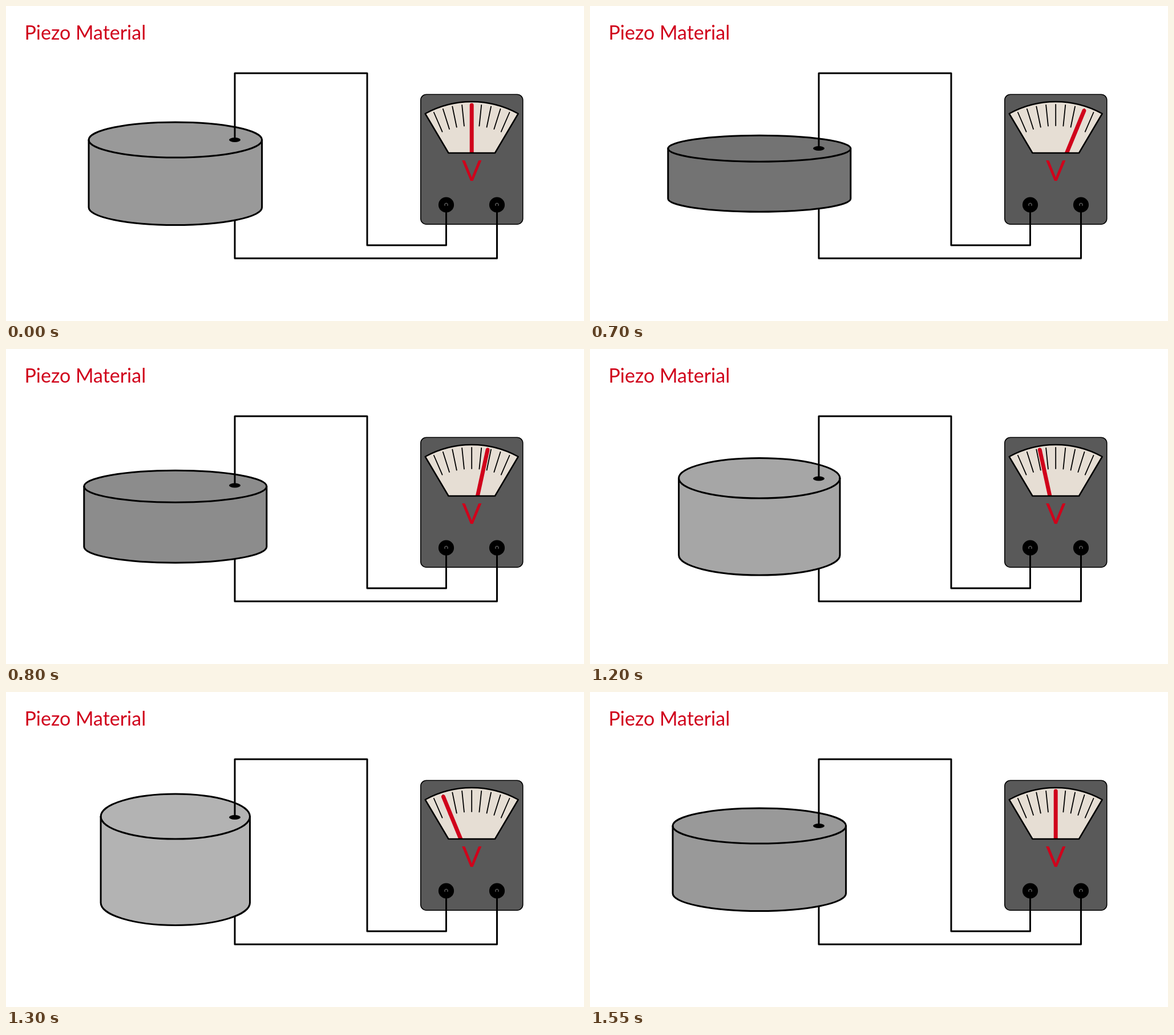
Recreate the animation shown at these times as an HTML page with a canvas. Size 1013x553 px, loop 1750 ms.

```html
<!DOCTYPE html>
<html lang="en">
<head>
<meta charset="utf-8">
<title>Piezo Material</title>
<style>
  html, body { margin: 0; width: 100%; height: 100%; overflow: hidden; background: #fff; }
  canvas { display: block; }
</style>
</head>
<body>
<canvas id="stage" width="1013" height="553"></canvas>
<script>
const ctx = document.getElementById('stage').getContext('2d');
const RED = '#d0021b', LOOP = 1750, TAU = Math.PI * 2;

// rx, ry: rim radii; half: half the side height; pin: contact height; needle: degrees
const rest     = { rx: 151.8, ry: 31,   half: 59.3, pin: 235,   grey: '#999', needle: 0 };
const pressed  = { rx: 160,   ry: 28,   half: 53,   pin: 239.5, grey: '#8c8c8c', needle: 12.3 };
const squeezed = { rx: 160,   ry: 23,   half: 44,   pin: 250,   grey: '#737373', needle: 22.3 };
const pulled   = { rx: 141.2, ry: 35.2, half: 67.5, pin: 227.5, grey: '#a6a6a6', needle: -12.3 };
const drawn    = { rx: 130.7, ry: 39.5, half: 75.7, pin: 220,   grey: '#b3b3b3', needle: -22.3 };

const steps = [
  [0, rest], [600, pressed], [700, squeezed], [800, pressed],
  [900, rest], [1200, pulled], [1300, drawn], [1450, pulled], [1550, rest]
];

function pen(color, width) {
  ctx.strokeStyle = color;
  ctx.lineWidth = width;
}

function line(...pts) {
  ctx.beginPath();
  for (let i = 0; i < pts.length; i += 2) ctx.lineTo(pts[i], pts[i + 1]);
  ctx.stroke();
}

function disc(x, y, rx, ry, color) {
  ctx.beginPath();
  ctx.ellipse(x, y, rx, ry, 0, 0, TAU);
  ctx.fillStyle = color;
  ctx.fill();
}

function text(str, x, y, size, align) {
  ctx.font = `${size}px Lato, sans-serif`;
  ctx.textAlign = align;
  ctx.fillStyle = RED;
  ctx.fillText(str, x, y);
}

function drawCylinder({ rx, ry, half, pin, grey }) {
  const x = 296.8, y = 294.3;
  pen('#000', 3);
  line(401, y + half, 401, 443, 860.5, 443, 860.5, 349);

  ctx.beginPath();
  ctx.ellipse(x, y - half, rx, ry, 0, Math.PI, TAU);
  ctx.ellipse(x, y + half, rx, ry, 0, 0, Math.PI);
  ctx.closePath();
  ctx.fillStyle = grey;
  ctx.fill();
  ctx.stroke();
  ctx.beginPath();
  ctx.ellipse(x, y - half, rx, ry, 0, 0, Math.PI);
  ctx.stroke();

  disc(401, pin, 10, 4, '#000');
  line(401, pin, 401, 118, 633, 118, 633, 420, 771.5, 420, 771.5, 349);
}

function drawDial(angle) {
  const cx = 816.2, cy = 336.7, r = 168.7;
  const edge = Math.asin(81.5 / r), top = -Math.PI / 2;
  ctx.beginPath();
  ctx.arc(cx, cy, r, top - edge, top + edge);
  ctx.lineTo(857, 258);
  ctx.lineTo(775.5, 258);
  ctx.closePath();
  ctx.fillStyle = '#e6ded4';
  ctx.fill();

  pen('#000', 1.8);
  for (let i = -4; i <= 4; i++) {
    const a = i * 5.85 * Math.PI / 180, s = Math.sin(a), c = Math.cos(a);
    line(cx + 167 * s, 340 - 167 * c, cx + 130 * s, 340 - 130 * c);
  }

  ctx.save();
  ctx.clip(dialWindow);
  ctx.translate(cx, 305);
  ctx.rotate(angle * Math.PI / 180);
  pen(RED, 7);
  line(0, -131, 0, -30);
  ctx.restore();

  pen('#000', 2.5);
  ctx.beginPath();
  ctx.arc(cx, cy, r, top - edge, top + edge);
  ctx.lineTo(857, 258);
  ctx.lineTo(775.5, 258);
  ctx.closePath();
  ctx.stroke();
}

const dialWindow = new Path2D();
dialWindow.rect(727, 155, 179, 102.5);

function drawMeter(angle) {
  ctx.beginPath();
  ctx.roundRect(726.8, 155.2, 179, 228, 10);
  ctx.fillStyle = '#595959';
  ctx.fill();
  pen('#000', 1.6);
  ctx.stroke();
  drawDial(angle);
  text('V', 816.2, 306.5, 51, 'center');
  for (const x of [771.5, 860.5]) {
    disc(x, 349, 13.6, 13.6, '#000');
    ctx.beginPath();
    ctx.arc(x, 349, 2.7, Math.PI * 0.85, Math.PI * 2.15);
    pen('#595959', 1.5);
    ctx.stroke();
  }
}

function frame(now) {
  const t = now % LOOP;
  const state = steps.findLast(([start]) => t >= start)[1];
  ctx.fillStyle = '#fff';
  ctx.fillRect(0, 0, 1013, 553);
  ctx.lineCap = ctx.lineJoin = 'round';
  text('Piezo Material', 32.5, 59, 34, 'left');
  drawMeter(state.needle);
  drawCylinder(state);
  requestAnimationFrame(frame);
}
requestAnimationFrame(frame);
</script>
</body>
</html>
```
